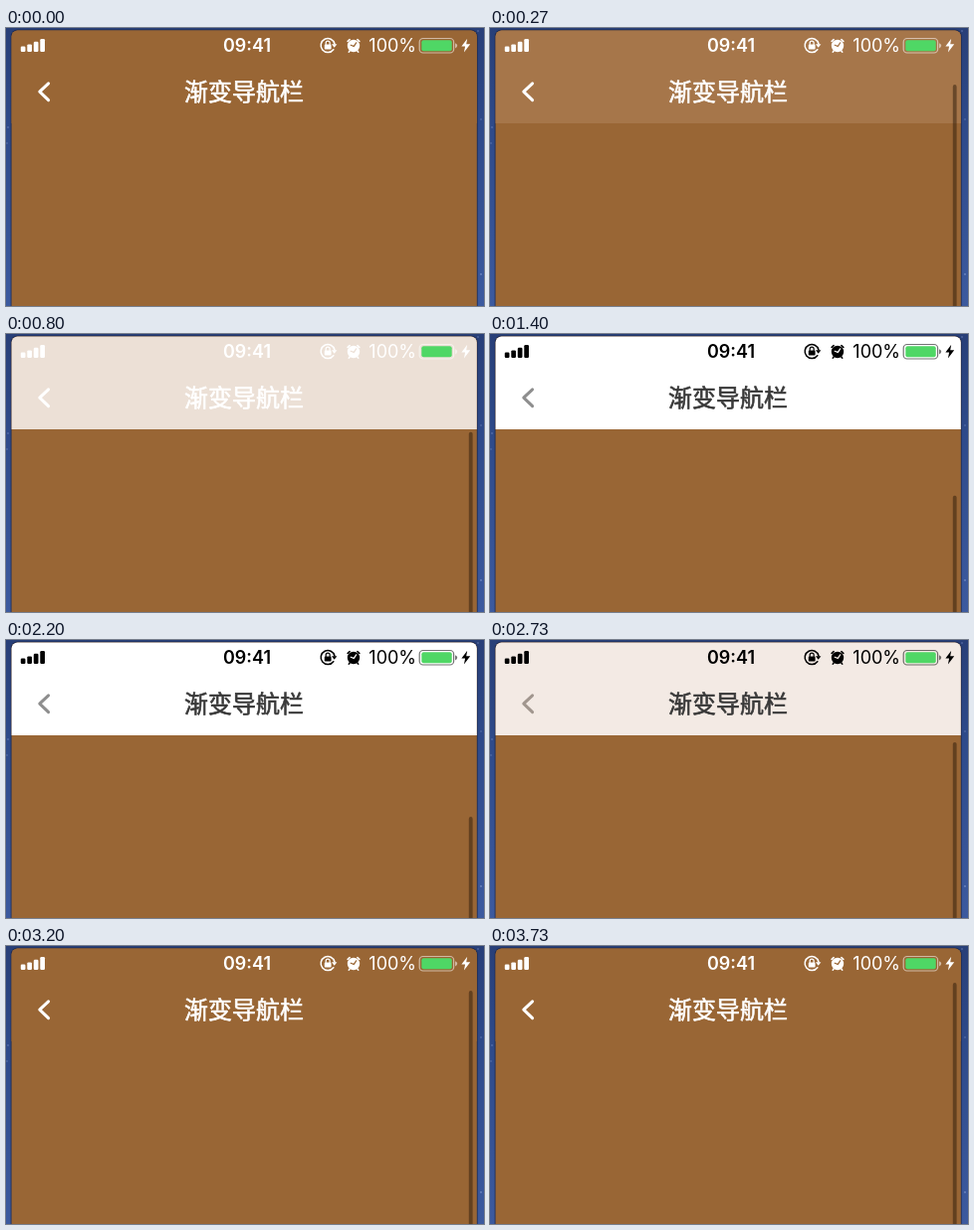
An HTML page that plays this animation: 480 px wide and 280 px high, repeating every 3790 ms.

```html
<!DOCTYPE html>
<html lang="zh-CN">
<head>
<meta charset="utf-8">
<title>渐变导航栏</title>
<style>
  html, body { margin: 0; width: 100%; height: 100%; overflow: hidden; background: #2e4884; }
  svg { display: block; width: 480px; height: 280px; --ink: #fff; --nav: #996635; color: var(--ink); }
  text { fill: currentColor; text-anchor: middle; font-family: Inter, Roboto, sans-serif; font-size: 18px; }
  .time { font-weight: 600; }
  .title {
    font: 500 24px "Noto Sans CJK SC", "Noto Sans CJK", sans-serif;
    fill: var(--title); stroke: var(--title); stroke-width: .6px;
  }
  .line { fill: none; stroke: currentColor; stroke-linecap: round; stroke-linejoin: round; }
  .cut { fill: none; stroke: var(--nav); stroke-linecap: round; stroke-width: 1.2; }
  .solid { fill: currentColor; }
</style>
</head>
<body>
<svg id="stage" viewBox="0 0 480 280">
  <defs>
    <linearGradient id="sky" x2="0" y2="1">
      <stop offset="0" stop-color="#283f78"/>
      <stop offset=".35" stop-color="#2e4a8a"/>
      <stop offset="1" stop-color="#3c5a9f"/>
    </linearGradient>
    <clipPath id="screen"><rect x="5.6" y="2.4" width="467.2" height="300" rx="6"/></clipPath>
  </defs>

  <rect width="480" height="280" fill="url(#sky)"/>
  <g fill="#8fa5d8" opacity=".6">
    <circle cx="2" cy="100" r=".8"/><circle cx="1" cy="116" r=".7"/>
    <circle cx="477" cy="92" r=".7"/><circle cx="477" cy="248" r=".9"/>
    <circle cx="474" cy="3" r=".8"/>
  </g>
  <rect x="4.6" y="1.4" width="469.2" height="300" rx="7" fill="#1b2340" opacity=".65"/>

  <g clip-path="url(#screen)">
    <rect width="480" height="280" fill="#996635"/>
    <rect width="480" height="96" fill="var(--nav)"/>

    <g class="solid">
      <rect x="14.8" y="18.6" width="4.7" height="5.4" rx="1.2"/>
      <rect x="21.3" y="16.4" width="4.7" height="7.6" rx="1.2"/>
      <rect x="27.8" y="13.8" width="4.7" height="10.2" rx="1.2"/>
      <rect x="34.3" y="11" width="4.7" height="13" rx="1.2"/>
    </g>
    <text class="time" x="242" y="24">09:41</text>

    <!-- rotation lock -->
    <path class="line" stroke-width="1.5" d="M328.8 21.7A7 7 0 1 1 330 16"/>
    <path class="solid" d="M327 16.2h5.4l-2.7 3.6z"/>
    <rect class="solid" x="319.8" y="16.6" width="6.8" height="5" rx=".8"/>
    <path class="line" stroke-width="1.2" d="M321.2 16.6v-1.4a2 2 0 0 1 4 0v1.4"/>

    <!-- alarm -->
    <circle class="solid" cx="349" cy="18" r="6.2"/>
    <path class="line" stroke-width="1.7" d="M343.2 13.4l1.9-1.7M354.8 13.4l-1.9-1.7"/>
    <path class="line" stroke-width="1.4" d="M345.2 23l-1 1.2M352.8 23l1 1.2"/>
    <path class="cut" d="M346.2 17.2l3.1 1.2 2.4-3.6"/>

    <text x="388.2" y="24">100%</text>
    <rect class="line" x="415.2" y="10.5" width="34.4" height="14.5" rx="3.6" stroke-width="1.2" opacity=".55"/>
    <rect x="417.3" y="12.3" width="30.4" height="10.9" rx="2" fill="#4fd765"/>
    <path class="solid" opacity=".55" d="M451 15.2q2.2 .8 2.2 2.6t-2.2 2.6z"/>
    <path class="solid" d="M463.2 10.8L457.4 18.4h3.7l-1.2 6 6.3-8.1h-4z"/>

    <path class="line" id="back" stroke-width="3" d="M42.6 55.8L33.8 64.2l8.8 8.4"/>
    <text class="title" x="239" y="72.5">渐变导航栏</text>

    <rect id="bar" x="464.8" width="3.8" height="300" rx="1.9" fill="#2c1a0a" fill-opacity=".5"/>
  </g>
</svg>
<script>
const LOOP = 3790, STEP = LOOP / 57;
const stage = document.getElementById('stage');
const bar = document.getElementById('bar');
const back = document.getElementById('back');

// time in ms, top of the scroll indicator
const path = [
  [0, 37], [70, 40], [470, 77], [800, 99], [1070, 122], [1400, 163], [1750, 178],
  [2200, 178], [2670, 113], [2930, 66], [3270, 42], [3600, 37], [LOOP, 37]
];
const slopes = path.slice(1).map(([t, y], i) => (y - path[i][1]) / (t - path[i][0]));
const tangent = i => {
  const a = slopes[i - 1] || 0, b = slopes[i] || 0;
  return a * b > 0 ? 2 * a * b / (a + b) : 0;
};

// monotone cubic through the scroll points
function scrollAt(t) {
  let i = 0;
  while (i < path.length - 2 && t >= path[i + 1][0]) i++;
  const [t0, y0] = path[i], [t1, y1] = path[i + 1];
  const h = t1 - t0, u = (t - t0) / h, v = 1 - u;
  return v * v * (1 + 2 * u) * y0 + u * u * (3 - 2 * u) * y1
    + h * u * v * (v * tangent(i) - u * tangent(i + 1));
}

const mix = (from, k) => Math.round(from + (255 - from) * k);

function draw(now) {
  const t = Math.floor((now % LOOP) / STEP + 0.05) * STEP % LOOP;
  const top = scrollAt(t);
  const a = Math.min(1, Math.max(0, (top - 51) / 60));
  // dark ink begins at full opacity and lasts until the bar is clear again
  const dark = t < 2000 ? a === 1 : a > 0;
  const set = (name, value) => stage.style.setProperty(name, value);
  set('--nav', `rgb(${mix(153, a ** 0.9)},${mix(102, a)},${mix(53, a)})`);
  set('--ink', dark ? '#000' : '#fff');
  set('--title', dark ? '#383838' : '#fff');
  back.style.stroke = dark ? (a < 1 ? '#a1968e' : '#8e8e8e') : '#fff';
  bar.setAttribute('y', top.toFixed(1));
  bar.style.opacity = t < STEP / 2 ? 0 : 1;
}

const start = performance.now();
function tick() {
  draw(performance.now() - start);
  requestAnimationFrame(tick);
}
tick();
</script>
</body>
</html>
```
